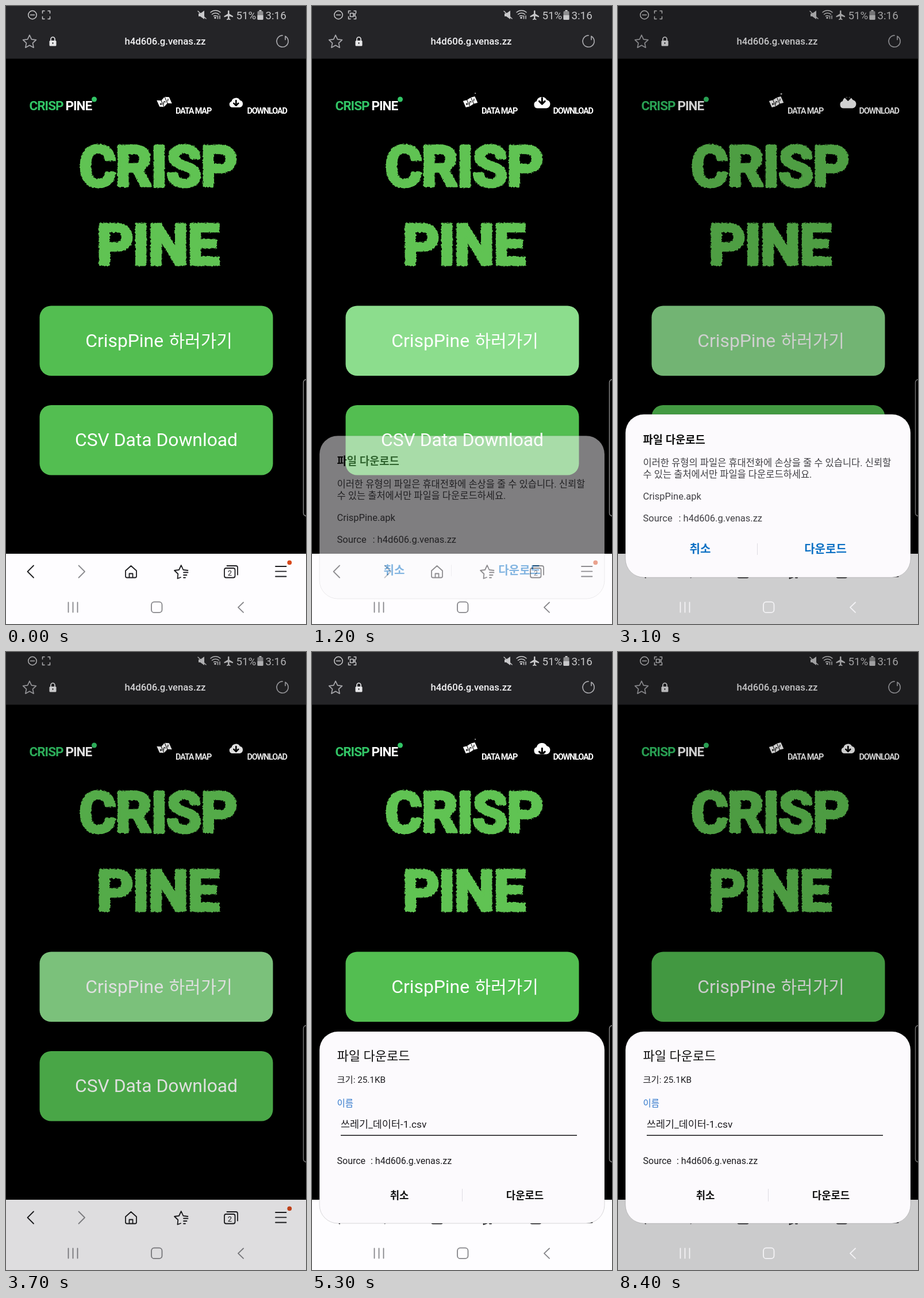
These frames come from a looping animation (522x1073 px, 8500 ms). An HTML page:

```html
<!DOCTYPE html>
<html lang="ko">
<head>
<meta charset="utf-8">
<title>Download page</title>
<style>
html, body { margin: 0; width: 100%; height: 100%; overflow: hidden; background: #000; }
svg { display: block; width: 100vw; height: 100vh; }
text { font-family: Roboto, "Noto Sans CJK KR", "Noto Sans CJK", sans-serif; white-space: pre; }
.line { fill: none; stroke-linecap: round; stroke-linejoin: round; }
.mid { text-anchor: middle; }
.hero { font-size: 99px; font-weight: 700; letter-spacing: -1.5px; fill: #60c352; stroke: #60c352; stroke-width: 5px; stroke-linejoin: round; }
.logo { font-size: 22.5px; font-weight: 700; letter-spacing: -1px; }
.menu { font-size: 14.5px; font-weight: 700; letter-spacing: -1.2px; fill: #fff; }
.btn { font-size: 31.8px; fill: #fff; }
.sheet { fill: #fcfafd; stroke: #000; stroke-opacity: .15; }
.body { font-size: 16.5px; fill: #414045; }
.small { font-size: 16px; fill: #1c1b1f; }
.blue { font-size: 20px; font-weight: 700; fill: #0c70c4; }
.act { font-size: 17.8px; font-weight: 700; fill: #111; }
</style>
</head>
<body>
<svg viewBox="0 0 522 1073" preserveAspectRatio="none">
  <defs>
    <path id="cloudShape" d="M-6.5 8A5.3 5.3 0 0 1-8-2.3 8 8 0 0 1 6.8-4.2 6.2 6.2 0 0 1 6.5 8Z"/>
    <clipPath id="cloudClip"><use href="#cloudShape"/></clipPath>
    <filter id="rough" x="-5%" y="-10%" width="110%" height="120%">
      <feTurbulence type="fractalNoise" baseFrequency=".3" numOctaves="2" seed="4"/>
      <feDisplacementMap in="SourceGraphic" scale="4" xChannelSelector="R" yChannelSelector="G"/>
    </filter>
    <filter id="worn">
      <feTurbulence type="fractalNoise" baseFrequency=".5" numOctaves="1" seed="2"/>
      <feDisplacementMap in="SourceGraphic" scale="1.6" xChannelSelector="R" yChannelSelector="G"/>
    </filter>
  </defs>

  <rect width="522" height="1073"/>
  <rect width="522" height="91.5" fill="#242427"/>

  <!-- status bar -->
  <g class="line" stroke="#c8c8ca" stroke-width="1.5">
    <circle cx="46" cy="15.5" r="7.2"/><path d="M42.5 15.5h7"/>
    <path d="M63.5 12.5v-4H67M73 8.5h3.500v4M76.5 18.5v4H73M67 22.5h-3.500v-4"/>
    <path id="rec" d="M66.500 12.500H72v6h-5.500zM72 15l3-2v5l-3-2"/>
    <path d="M334 9l14 13"/>
    <path d="M356 11a13 13 0 0 1 17 0M358.5 14.5a9 9 0 0 1 12 0M361.5 17.5a5 5 0 0 1 5 0M368.5 17v5M372 17v5"/>
  </g>
  <g fill="#c8c8ca">
    <path d="M335 13h3l7-5v15l-7-5h-3z"/><circle cx="364" cy="20.5" r="1.8"/>
    <path d="M386 8.5q1.5-2 2.5 0v5l6.5 4v2l-6.500-2v4l2 1.5v1.2l-3.200-.8-3.300.8V23l2-1.500v-4l-6.500 2v-2l6.500-4z"/>
    <rect x="437.5" y="9" width="10" height="15" rx="1.5" opacity=".65"/>
    <path d="M440.5 7h4v2h-4zM437.5 16h10v6.500q0 1.500-1.500 1.500h-7q-1.500 0-1.500-1.500z"/>
    <g font-size="18.8"><text x="400.5" y="23">51%</text><text x="451.5" y="23">3:16</text></g>
  </g>

  <!-- address bar -->
  <path class="line" transform="translate(41 62.5)" stroke="#a9a9ad" stroke-width="1.7"
    d="M0-12 3.4-4.6 11.4-3.7 5.5 1.8 7.1 9.7 0 5.7-7.1 9.7-5.5 1.8-11.4-3.7-3.4-4.6Z"/>
  <rect x="75.5" y="60" width="12" height="9.5" rx="1.5" fill="#e6e6e8"/>
  <path class="line" d="M78 60v-2.500a3.500 3.500 0 0 1 7 0V60" stroke="#e6e6e8" stroke-width="1.7"/>
  <path d="M81.5 63v3" stroke="#242427" stroke-width="1.5"/>
  <path class="line" d="M486 52.5a10 10 0 1 1-5-1.300M486 52.5v6" stroke="#a9a9ad" stroke-width="1.7"/>
  <text class="mid" x="277" y="67" font-size="16.7" font-weight="500" fill="#f2f2f4">h4d606.g.venas.zz</text>

  <!-- page -->
  <text class="logo" x="40.5" y="181" fill="#32c566">CRISP</text>
  <text class="logo" x="103.5" y="181" fill="#fff">PINE</text>
  <circle cx="153.5" cy="162" r="4.5" fill="#32c566"/>
  <g filter="url(#worn)">
    <text class="menu" x="295" y="187">DATA MAP</text>
    <text class="menu" x="419.5" y="187">DOWNLOAD</text>
  </g>
  <g transform="translate(275.5 166.5) rotate(-24)">
    <path id="map" fill="#fff"/>
    <path id="folds" class="line" stroke="#000"/>
    <path class="line" d="M-8 2l2-2M-8 0l2 2M-2.5 3q2-6 4-2M6 1l2-3" stroke="#000" stroke-width="1.2"/>
  </g>
  <circle id="pin" cx="284" class="line" stroke="#fff"/>
  <g id="cloud">
    <use href="#cloudShape" fill="#fff"/>
    <g clip-path="url(#cloudClip)"><path id="arrow" class="line" d="M0-4V4.500M-4 .8 0 4.800 4 .8" stroke="#000" stroke-width="2.6"/></g>
  </g>
  <g filter="url(#rough)">
    <text class="hero mid" x="264" y="313">CRISP</text>
    <text class="hero mid" x="264" y="449">PINE</text>
  </g>
  <rect id="go" x="58.5" y="520.5" width="406" height="121.5" rx="20"/>
  <rect id="csv" x="58.5" y="693" width="406" height="121.5" rx="20"/>
  <text class="btn" x="274" y="591.5" text-anchor="end">CrispPine</text>
  <text class="btn" x="283.5" y="591.5" style="font-size:30px">하러가기</text>
  <text class="btn mid" x="261.5" y="763.5">CSV Data Download</text>
  <rect x="517.5" y="648.5" width="14" height="237" rx="5" stroke="#858585" stroke-width="1.5"/>

  <!-- browser toolbar -->
  <rect y="951" width="522" height="122" fill="#fefdff"/>
  <g class="line" stroke="#1d1d20" stroke-width="1.8">
    <path d="M48 971.5 37.5 982 48 992.5"/>
    <path d="M126.5 971.5 137 982l-10.500 10.500" stroke="#8c8c90"/>
    <path d="M208 980.5l9.500-8.500 9.500 8.500v9.500q0 2.500-2.500 2.500h-14q-2.500 0-2.500-2.500zM214.5 992v-6.500h6v6.500"/>
    <path d="M304 992l-5.500 2 .8-8-6.300-6 8-1 3.800-8 3.600 8 8 1M309 983.5h7.500M309 988h5.500M309 992.5h3"/>
    <rect x="380" y="976" width="18.5" height="16.5" rx="3"/>
    <path d="M384.5 972H400q3 0 3 3v12.500M469 973h18.500M469 981.7h18.500M469 990.5h18.500"/>
  </g>
  <text class="mid" x="389.3" y="989" font-size="13" fill="#1d1d20">2</text>
  <circle cx="493.3" cy="966.3" r="3.9" fill="#d9491c"/>

  <rect id="dim" width="522" height="1073"/>

  <g id="warn">
    <rect class="sheet" x="13" y="709" width="496" height="283" rx="32"/>
    <text x="43.5" y="760" font-size="18.8" font-weight="700" fill="#111">파일 다운로드</text>
    <g class="body">
      <text x="43.5" y="799">이러한 유형의 파일은 휴대전화에 손상을 줄 수 있습니다. 신뢰할</text>
      <text x="43.5" y="818.5">수 있는 출처에서만 파일을 다운로드하세요.</text>
      <text x="43.5" y="857">CrispPine.apk</text>
      <text x="43.5" y="895">Source</text><text x="105.5" y="895">: h4d606.g.venas.zz</text>
    </g>
    <text class="blue mid" x="143" y="950">취소</text>
    <text class="blue mid" x="361" y="950">다운로드</text>
    <path d="M242.5 933v20" stroke="#dddce2"/>
  </g>

  <g id="save">
    <rect class="sheet" x="13" y="659" width="496" height="333" rx="32"/>
    <text x="43.5" y="708.5" font-size="22" fill="#111">파일 다운로드</text>
    <g class="small">
      <text x="43.5" y="748" style="font-size:15.3px">크기: 25.1KB</text>
      <text x="43.5" y="789" style="font-size:15.5px;fill:#3279cc">이름</text>
      <text x="50" y="825.5" style="font-size:17.4px">쓰레기_데이터-1.csv</text>
      <text x="43.5" y="888.5">Source</text><text x="102" y="888.5">: h4d606.g.venas.zz</text>
    </g>
    <path d="M50 839.3h411" stroke="#151517" stroke-width="1.4"/>
    <text class="act mid" x="152" y="949.5">취소</text>
    <text class="act mid" x="370.5" y="949.5">다운로드</text>
    <path d="M261.5 932v22" stroke="#dddce2"/>
  </g>

  <g id="keys" class="line" stroke-width="1.8">
    <path d="M108.5 1035.5v17M116.5 1035.5v17M124.5 1035.5v17M413 1035.5l-9 8.700 9 8.700"/>
    <rect x="253" y="1034.7" width="18.5" height="18.5" rx="5"/>
  </g>
</svg>
<script>
const LOOP = 8500, ICONS = 2000, BLINK = 1000;
const $ = id => document.getElementById(id);
const set = (id, attrs) => { for (const k in attrs) $(id).setAttribute(k, attrs[k]); };
const show = on => on ? "visible" : "hidden";

// Linear interpolation through [time, value] pairs
function track(t, ...keys) {
  if (t <= keys[0][0]) return keys[0][1];
  for (let i = 1; i < keys.length; i++) {
    const [t0, a] = keys[i - 1], [t1, b] = keys[i];
    if (t < t1) return a + (b - a) * (t - t0) / (t1 - t0);
  }
  return keys[keys.length - 1][1];
}

const mix = (a, b, k) => `rgb(${a.map((v, i) => Math.round(v + (b[i] - v) * k))})`;
const buttonColor = k => mix([83, 190, 81], [140, 221, 141], k);

function sheet(id, shown) {
  set(id, {
    opacity: shown,
    transform: `translate(0 ${75 * (1 - shown)})`,
    visibility: show(shown > 0)
  });
}

function icons(t) {
  const d = track(t, [0, 1.8], [400, .6], [1300, .6], [1700, 1.8]);
  const xs = [-11, -4, 4, 11];
  const edge = y => xs.map((x, i) => `${x} ${y + (i % 2 ? d : -d)}`);
  const top = edge(-6), low = edge(6);
  set("map", { d: `M${top.join("L")}L${[...low].reverse().join("L")}Z` });
  set("folds", { d: `M${top[1]}L${low[1]}M${top[2]}L${low[2]}` });

  set("pin", {
    cy: track(t, [700, 157], [900, 155], [1200, 151.5]),
    r: track(t, [700, 2], [900, 1.6], [1200, .5]),
    visibility: show(t > 750 && t < 1400)
  });

  // The arrow falls out of the cloud and drops back in from above
  const size = track(t, [750, 1], [1050, 1.2], [1350, 1.2], [1650, 1]);
  const drop = t < 1050
    ? track(t, [700, 0], [900, 5], [1050, 14])
    : track(t, [1050, -12], [1200, -3], [1300, 3.5], [1500, 0]);
  set("cloud", { transform: `translate(400.3 168) scale(${size})` });
  set("arrow", { transform: `translate(0 ${drop})` });
}

function draw(t) {
  const blink = t % BLINK;
  icons(t % ICONS);
  set("rec", { visibility: show(blink >= 150 && blink < 650) });
  set("go", { fill: buttonColor(track(t, [850, 0], [1000, 1], [4700, 1], [4850, 0])) });
  set("csv", { fill: buttonColor(track(t, [4800, 0], [4950, 1])) });

  const dim = track(t, [1320, 0], [1500, .19], [3600, .19], [3900, 0], [5320, 0], [5500, .2]);
  set("dim", { opacity: dim });
  set("keys", { stroke: dim > .18 ? "#f4f3f6" : mix([134, 134, 138], [0, 0, 0], dim) });

  sheet("warn", track(t, [1100, 0], [1300, 1], [3500, 1], [3700, 0]));
  sheet("save", track(t, [5050, 0], [5250, 1]));
}

const start = performance.now();
function frame() {
  draw((performance.now() - start) % LOOP);
  requestAnimationFrame(frame);
}
draw(0);
requestAnimationFrame(frame);
</script>
</body>
</html>
```
